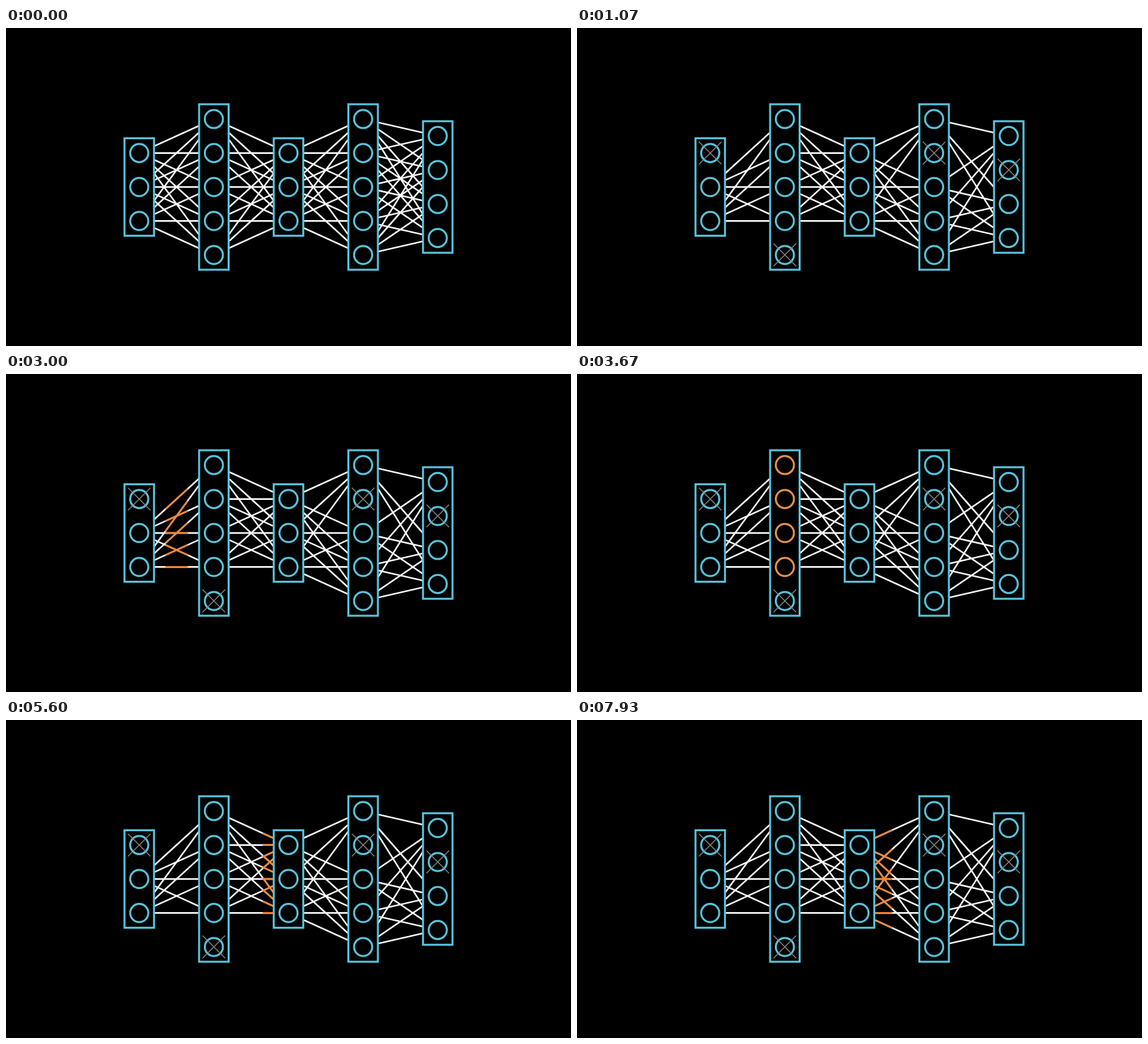
These frames come from a looping animation (854 by 480 pixels, 8 s). An HTML page with a canvas:

```html
<!DOCTYPE html>
<html lang="en">
<head>
<meta charset="utf-8">
<title>Dropout forward pass</title>
<style>
  html, body { margin: 0; width: 100%; height: 100%; overflow: hidden; background: #000; }
  canvas { display: block; }
</style>
</head>
<body>
<canvas id="stage" width="854" height="480"></canvas>
<script>
const ctx = document.getElementById('stage').getContext('2d');

const LOOP = 8, FPS = 15;
const BLUE = [88, 196, 221], ORANGE = [255, 134, 47];
const LAYER_GAP = 112.8, NODE_GAP = 51.3, RADIUS = 13.7, PAD = 22.3, CROSS = 17;
const FLASH_WIDTH = 0.3;

// Each layer: node count and index of the dropped node (-1 for none).
const layers = [[3, 0], [5, 4], [3, -1], [5, 1], [4, 1]].map(([count, dropped], i) => {
  const x = 427 + (i - 2) * LAYER_GAP;
  const nodes = Array.from({ length: count }, (_, j) => ({
    x, y: 240 + (j - (count - 1) / 2) * NODE_GAP, dropped: j === dropped
  }));
  return { x, nodes, start: 1 + 2.5 * i };
});

const clamp = v => Math.min(1, Math.max(0, v));
const mix = (a, b, p) => a + (b - a) * p;
const rgb = c => `rgb(${c.map(Math.round)})`;
const sigmoid = v => 1 / (1 + Math.exp(-v));

// Sigmoid ease, normalised to run exactly from 0 to 1.
function smooth(v) {
  const tail = sigmoid(-5);
  return clamp((sigmoid(10 * (clamp(v) - 0.5)) - tail) / (1 - 2 * tail));
}

function segment(x1, y1, x2, y2, from, to, color, width) {
  if (to <= from) return;
  ctx.strokeStyle = color;
  ctx.lineWidth = width;
  ctx.beginPath();
  ctx.moveTo(mix(x1, x2, from), mix(y1, y2, from));
  ctx.lineTo(mix(x1, x2, to), mix(y1, y2, to));
  ctx.stroke();
}

function drawEdges(layer, next, t) {
  const pairs = layer.nodes.flatMap(a => next.nodes.map(b => [a, b]));
  const fade = 1 - smooth(t);
  for (const [a, b] of pairs) {
    ctx.globalAlpha = a.dropped || b.dropped ? fade : 1;
    segment(a.x, a.y, b.x, b.y, 0, 1, '#fff', 2.4);
  }
  ctx.globalAlpha = 1;

  const head = smooth(t - layer.start - 1.5) * (1 + FLASH_WIDTH);
  for (const [a, b] of pairs) {
    if (a.dropped || b.dropped) continue;
    segment(a.x, a.y, b.x, b.y, clamp(head - FLASH_WIDTH), clamp(head), rgb(ORANGE), 2.4);
  }
}

function drawLayer({ x, nodes, start }, t) {
  const top = nodes[0].y - PAD, height = nodes[nodes.length - 1].y + PAD - top;
  const glow = smooth((t - start) / 0.25) - smooth((t - start - 1.25) / 0.25);
  const active = rgb(BLUE.map((c, i) => mix(c, ORANGE[i], glow)));

  ctx.lineWidth = 3;
  ctx.fillStyle = '#000';
  ctx.strokeStyle = rgb(BLUE);
  ctx.fillRect(x - PAD, top, 2 * PAD, height);
  ctx.strokeRect(x - PAD, top, 2 * PAD, height);

  for (const { y, dropped } of nodes) {
    ctx.lineWidth = 3;
    ctx.strokeStyle = dropped ? rgb(BLUE) : active;
    ctx.beginPath();
    ctx.arc(x, y, RADIUS, 0, 2 * Math.PI);
    ctx.stroke();
    if (!dropped) continue;
    // The two strokes of the cross follow one another.
    [-1, 1].forEach((side, i) => segment(
      x + side * CROSS, y - CROSS, x - side * CROSS, y + CROSS,
      0, smooth(2 * t - i), '#888', 1.4));
  }
}

function draw(now) {
  // Motion advances in steps of 1/15 s.
  const t = Math.floor((now / 1000 % LOOP + 0.005) * FPS) / FPS % LOOP;
  ctx.fillStyle = '#000';
  ctx.fillRect(0, 0, 854, 480);
  layers.slice(0, -1).forEach((layer, i) => drawEdges(layer, layers[i + 1], t));
  layers.forEach(layer => drawLayer(layer, t));
}

let origin;
function frame(now) {
  origin ??= now;
  draw(now - origin);
  requestAnimationFrame(frame);
}
requestAnimationFrame(frame);
</script>
</body>
</html>
```
